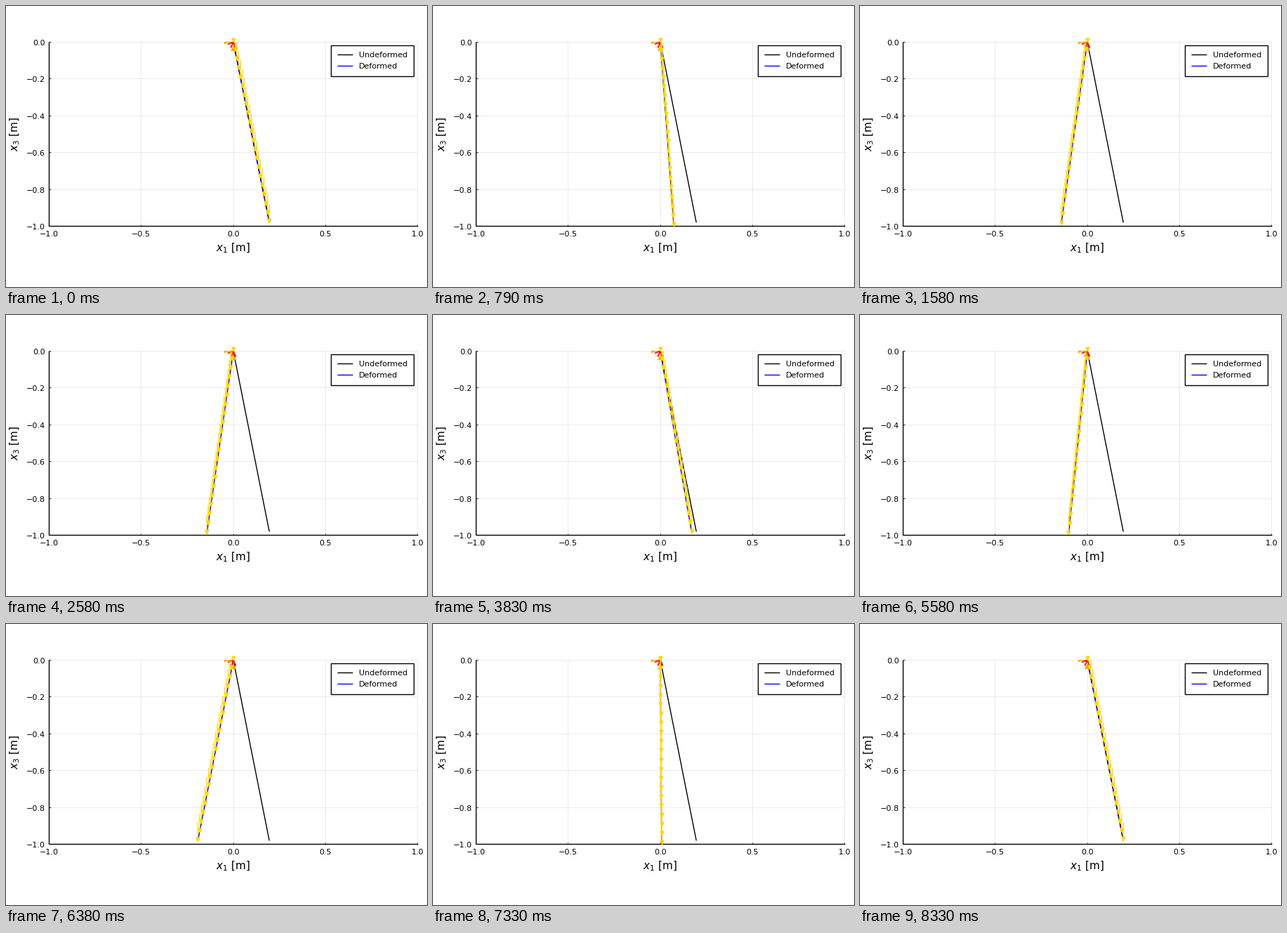
Recreate the animation shown at these times as a matplotlib script. Size 600 px wide and 400 px high, loop 8.37 s.

```python
import numpy as np
import matplotlib.pyplot as plt
from matplotlib.animation import FuncAnimation
from matplotlib.path import Path

W, H, DPI = 600, 400, 100
LEFT, RIGHT, TOP, BOTTOM = 61.1, 586.9, 51.45, 313.45
POSES, LOOP_MS = 201, 8370
FRAMES = 2 * POSES        # half steps keep each pose centred on its time
SWING = np.pi / 16        # starting angle
PERIOD = 100 * (1 + SWING ** 2 / 16)   # poses per swing
NODES = np.linspace(0, 1, 21)
SHAFT = 0.1               # length of a weight arrow
GOLD, ORANGE = "#ffd700", "#ffa500"

plt.rcParams["font.family"] = "DejaVu Sans"
plt.rcParams["mathtext.fontset"] = "dejavusans"

fig = plt.figure(figsize=(W / DPI, H / DPI), dpi=DPI, facecolor="white")
ax = fig.add_axes([0, 0, 1, 1])
ax.set_xlim(0, W)
ax.set_ylim(H, 0)
ax.axis("off")


def pt(pixels):
    return pixels * 72 / DPI


def px(x):
    return LEFT + (x + 1) / 2 * (RIGHT - LEFT)


def py(z):
    return TOP - z * (BOTTOM - TOP)


def line(xs, ys, color="black", width=1.39, **kw):
    return ax.plot(xs, ys, color=color, lw=pt(width),
                   solid_capstyle="butt", **kw)[0]


def label(x, y, text, size=8, **kw):
    ax.text(x, y, text, fontsize=size, va="baseline", **kw)


def number(v):
    return f"{v:.1f}".replace("-", "\u2212")


def beam(angle):
    return px(NODES * np.sin(angle)), py(-NODES * np.cos(angle))


def draw_axes():
    for v in np.linspace(-1, 1, 5):
        x = np.floor(px(v))
        line([x, x], [TOP, BOTTOM], width=1, alpha=0.08, zorder=1)
        line([x, x], [BOTTOM, BOTTOM - 2.6], width=0.8, zorder=1)
        label(px(v), 328, number(v), ha="center")
    for k in range(6):
        v = k / 5
        y = np.floor(py(-v))
        line([LEFT, RIGHT], [y, y], width=1, alpha=0.08, zorder=1)
        line([LEFT, LEFT + 2.6], [y, y], width=0.8, zorder=1)
        label(55.5, py(-v) + 4.55, number(-v if k else 0), ha="right")
    line([LEFT, LEFT, RIGHT], [TOP, BOTTOM, BOTTOM], zorder=2)
    label(px(0), 349, "$x_1$ [m]", 11, ha="center")
    label(17, 182.5, "$x_3$ [m]", 11, ha="center", rotation=90,
          rotation_mode="anchor")


def draw_legend():
    ax.add_patch(plt.Rectangle((463, 56), 118, 44, fc="white", ec="black",
                               lw=pt(1.39), zorder=8))
    rows = [(69, "black", "Undeformed"), (85, "blue", "Deformed")]
    for y, color, text in rows:
        line([472, 494], [y, y], color, zorder=9)
        label(503, y + 4, text, zorder=9)


def draw_support():
    x, y = px(0), TOP
    line([x - 13, x], [y, y], ORANGE, 1.2, zorder=5)
    line([x, x], [y, y + 13], ORANGE, 1.2, zorder=5)
    heads = [
        [(x - 13, y - 0.5), (x - 13, y + 3), (x - 6.5, y)],
        [(x - 4, y + 12.5), (x + 4, y + 12.5), (x, y + 5.5)],
    ]
    for head in heads:
        ax.add_patch(plt.Polygon(head, fc=ORANGE, lw=0, zorder=5))
    for dx, dy in [(-8, 3), (-3.6, 8), (3.6, 8)]:
        line([x, x + dx], [y, y + dy], "red", 1.8, zorder=6)


draw_axes()
draw_legend()
draw_support()

line(*beam(SWING), zorder=3)
deformed = line([], [], "blue", zorder=4)
shafts = line([], [], GOLD, 1.3, zorder=7, snap=False)
arrow = Path([(-3, 6), (3, 6), (3, 5), (0.7, -0.5), (-0.7, -0.5), (-3, 5),
              (-3, 6)], closed=True)
heads = ax.plot([], [], ls="", marker=arrow, ms=pt(12), mfc=GOLD, mew=0,
                zorder=7, snap=False)[0]


def with_gaps(a, b):
    return np.column_stack([a, b, np.full_like(a, np.nan)]).ravel()


def update(i):
    pose = min((i + 1) // 2, POSES - 1)
    x, y = beam(SWING * np.cos(2 * np.pi * pose / PERIOD))
    tops = np.maximum(y - SHAFT * (BOTTOM - TOP), TOP)
    deformed.set_data(x, y)
    shafts.set_data(with_gaps(x, x), with_gaps(tops, np.maximum(y - 2, TOP)))
    heads.set_data(x, y)
    return deformed, shafts, heads


anim = FuncAnimation(fig, update, frames=FRAMES, interval=LOOP_MS / FRAMES,
                     repeat=True, repeat_delay=0, blit=False)
plt.show()
```
